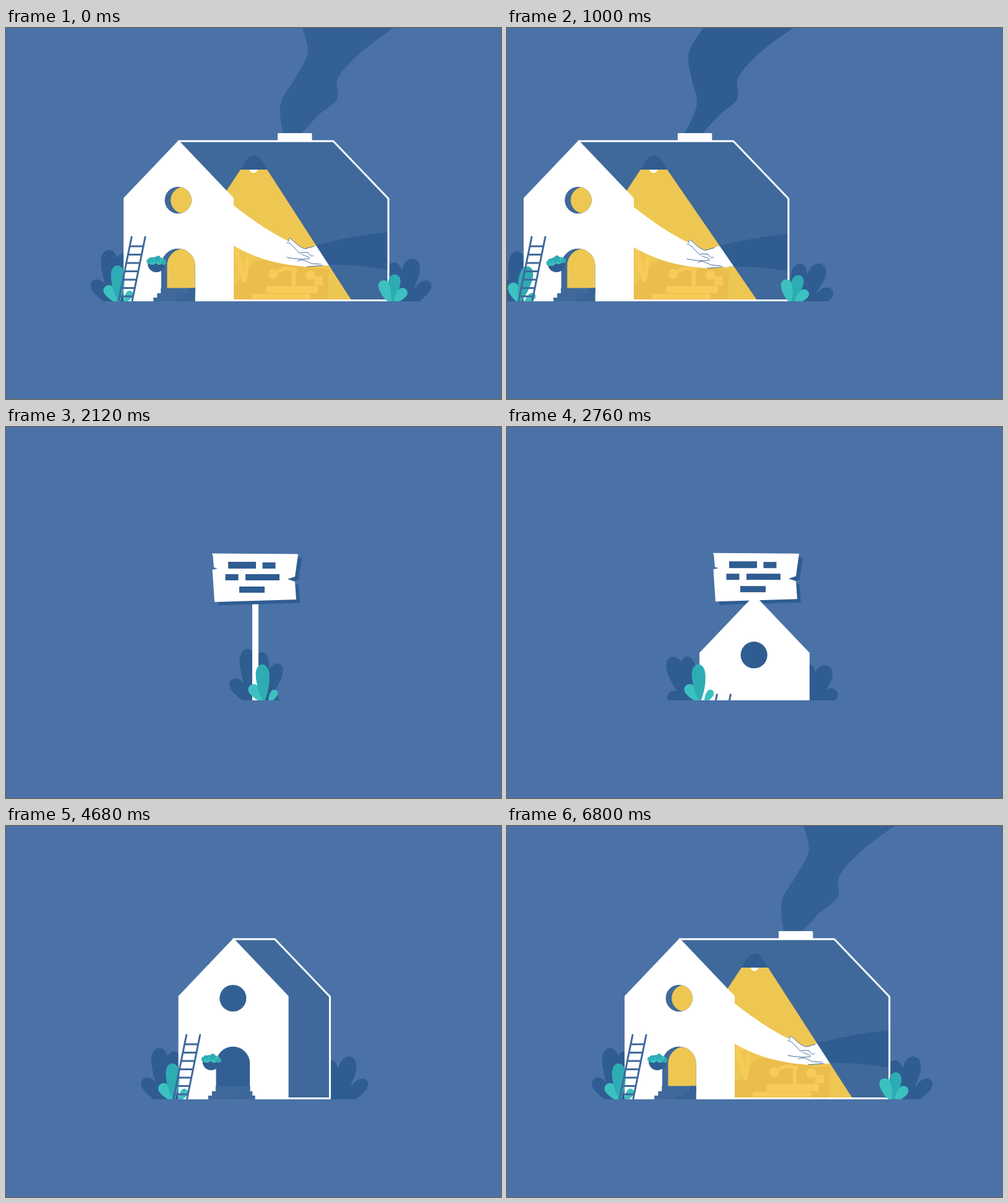
An HTML page with a canvas that plays this animation: 800x600 px, repeating every 6.84 s.

```html
<!DOCTYPE html>
<html lang="en">
<head>
<meta charset="utf-8">
<title>House</title>
<style>
html, body { margin: 0; width: 100%; height: 100%; overflow: hidden; background: #4a72a7; }
canvas { display: block; }
</style>
</head>
<body>
<canvas id="stage" width="800" height="600"></canvas>
<script>
const g = document.getElementById('stage').getContext('2d');
const LOOP = 6840, GROUND = 442;
const BG = '#4a72a7', DARK = '#2f5d92', ROOM = '#3f699b', WHITE = '#fff';
const GOLD = '#eec752', OCHRE = '#ebbd4c', AMBER = '#f6cb58';
const TEAL = '#2eacb4', MINT = '#3dc0c0';

const clamp = v => Math.max(0, Math.min(1, v));
const ramp = (t, a, b) => clamp((t - a) / (b - a));
const lerp = (a, b, k) => a + (b - a) * k;
const inOut = u => u < .5 ? 4 * u ** 3 : 1 - 4 * (1 - u) ** 3;
const out = u => 1 - (1 - u) ** 3;
const back = u => 1 + 2.7 * (u - 1) ** 3 + 1.7 * (u - 1) ** 2;
const rad = d => d * Math.PI / 180;

function poly(points, color) {
  g.beginPath();
  points.forEach(([x, y]) => g.lineTo(x, y));
  g.closePath();
  if (color) { g.fillStyle = color; g.fill(); }
}
function box(x, y, w, h, color) { g.fillStyle = color; g.fillRect(x, y, w, h); }
function disc(x, y, r, color) {
  g.beginPath(); g.arc(x, y, r, 0, 7);
  g.fillStyle = color; g.fill();
}
function shape(d, color) { g.fillStyle = color; g.fill(new Path2D(d)); }
function lines(d, color, width) {
  g.strokeStyle = color; g.lineWidth = width;
  g.lineCap = g.lineJoin = 'round';
  g.stroke(new Path2D(d));
}
function group(draw) { g.save(); draw(); g.restore(); }

// Leaves: base offset, length, half width, angle, colour
const LEFT_BUSH = [[12, 95, 14.5, -8], [18, 89, 12.5, 4], [15, 60, 11.5, -43], [22, 76, 12, 23]];
const RIGHT_BUSH = [[-20, 83, 14.5, 16], [-12, 58, 11, 43], [-29, 74, 13, -1]];
const LEFT_TEAL = [[0, 36, 9, -38, MINT], [7, 24, 6, 32, MINT], [0, 62, 11, -3, TEAL]];
const RIGHT_TEAL = [[0, 48, 10, 9, TEAL], [-1, 40, 9, -20, MINT], [4, 31, 8, 40, MINT]];

function leaf(x, y, len, w, deg, color) {
  if (len <= 0) return;
  group(() => {
    g.translate(x, y);
    g.rotate(rad(deg));
    g.beginPath();
    g.moveTo(0, 0);
    g.bezierCurveTo(-w * .7, -len * .25, -w, -len * .5, -w, -len * .72);
    g.bezierCurveTo(-w, -len * .9, -w * .55, -len, 0, -len);
    g.bezierCurveTo(w * .55, -len, w, -len * .9, w, -len * .72);
    g.bezierCurveTo(w, -len * .5, w * .7, -len * .25, 0, 0);
    g.fillStyle = color; g.fill();
  });
}
// Slanted leaves lean and shorten more than upright ones
function bush(leaves, x, lean, droop, grow, from, to) {
  leaves.forEach(([dx, len, w, a]) => {
    const slant = Math.abs(a);
    leaf(x + dx, 453, len * grow * (1 - droop * (.05 + slant / 210)), w * grow, a + lean * (.85 + slant / 80), DARK);
  });
  poly([[x + from, 442], [x + from + 9, 442 - 28 * grow], [x + to - 12, 442 - 28 * grow], [x + to, 442]], DARK);
}
function tealBush(leaves, x, lean, grow) {
  leaves.forEach(([dx, len, w, a, c], i) => {
    const k = grow(i);
    leaf(x + dx, 446, len * k, w * Math.min(1, k), a + lean - (1 - k) * 15, c);
  });
}

// Smoke edges at six heights, for three moments
const SMOKE_Y = [170, 140, 115, 80, 40, 0];
const SMOKE = [
  { t: 5400, l: [456, 457, 451, 450, 471, 495], r: [487, 494, 503, 567, 588, 598] },
  { t: 6830, l: [447, 443, 446, 468, 488, 479], r: [478, 506, 535, 537, 573, 626] },
  { t: 7840, l: [450, 465, 470, 461, 457, 480], r: [480, 507, 535, 537, 572, 625] }
];
function edge(points) {
  for (let i = 0; i < points.length - 1; i++) {
    const p = points[Math.max(0, i - 1)], a = points[i], b = points[i + 1];
    const n = points[Math.min(points.length - 1, i + 2)];
    g.bezierCurveTo(a[0] + (b[0] - p[0]) / 6, a[1] + (b[1] - p[1]) / 6,
      b[0] - (n[0] - a[0]) / 6, b[1] - (n[1] - a[1]) / 6, b[0], b[1]);
  }
}
function smoke(t) {
  const alpha = t < 5400 ? ramp(t, 5000, 5400) * .28 : t < 6840 ? lerp(.28, .85, ramp(t, 5400, 6840)) : lerp(.85, 1, ramp(t, 6840, 7300));
  if (!alpha) return;
  const i = t < SMOKE[1].t ? 0 : 1, a = SMOKE[i], b = SMOKE[i + 1];
  const k = ramp(t, a.t, b.t);
  const side = s => SMOKE_Y.map((y, n) => [lerp(a[s][n], b[s][n], k), y]);
  const left = side('l'), right = side('r').reverse();
  group(() => {
    g.globalAlpha = alpha;
    g.beginPath();
    g.moveTo(...left[0]);
    edge(left);
    g.lineTo(...right[0]);
    edge(right);
    g.fillStyle = DARK; g.fill();
  });
}

function furniture() {
  box(372, 338, 52, 24, AMBER);
  box(380, 342, 14, 16, OCHRE);
  box(406, 342, 13, 16, OCHRE);
  shape('M368 414 C384 412 388 384 405 377 C430 372 462 376 482 388 L522 390 L520 439 H368Z', OCHRE);
  shape('M384 412 C374 392 368 372 371 352 C380 368 386 390 386 412Z M384 412 C383 390 386 372 391 358 C395 378 391 398 388 412Z', AMBER);
  box(372, 415, 25, 23, OCHRE);
  box(397, 430, 95, 8, AMBER);
  box(420, 417, 84, 12, AMBER);
  disc(432, 398, 8, AMBER);
  disc(492, 400, 8, AMBER);
  lines('M442 392 C452 387 460 389 468 391 M465 392 V414', AMBER, 6);
  box(498, 402, 14, 14, AMBER);
}

const OPEN_HAND = 'M330 300 L368 305 C385 304 395 306 405 309 C409 300 414 292 420 290 C424 292 419 300 416 305 ' +
  'C423 297 430 291 434 293 C436 297 427 305 421 311 C430 305 440 301 444 304 C444 310 430 317 422 324 ' +
  'C432 321 443 320 445 323 C445 329 432 333 420 337 C402 342 385 345 368 346 L330 348Z';
const OPEN_LINES = 'M375 315 C385 312 395 314 401 317 C406 317 412 314 417 309 C416 316 402 325 391 334 M407 309 C411 299 415 292 420 290 ' +
  'C423 293 419 300 415 307 M416 305 C423 297 430 291 434 293 C435 298 427 305 420 311 M421 311 C430 305 440 301 444 304 C443 311 428 319 419 327 ' +
  'M422 324 C432 321 443 320 445 323 C445 329 432 333 421 336';
const LEFT_ARM = 'M340 266 L368 287 C397 310 428 331 457 345 C455 341 458 338 462 342 C469 349 476 355 484 357 L500 353 L522 384 ' +
  'L485 386 C440 383 402 372 368 352 L340 340Z';
const RIGHT_ARM = 'M478 357 C488 357 494 354 502 351 C540 341 575 335 617 330 V391 C585 385 555 383 522 383 L490 386 C473 384 468 378 478 373Z';
const SHAKE_LINES = 'M454 347 C462 347 468 360 476 365 M457 345 C455 340 459 339 463 343 C470 350 477 356 484 357 L498 353 ' +
  'M454 371 C465 373 478 375 490 373 C491 370 487 370 478 366 M476 363 L488 363 C491 369 495 370 497 368 M471 377 C478 372 484 377 494 381 L509 382 M487 386 L512 384';

function arms(t, cone) {
  if (t < 5120) return;
  const reach = inOut(ramp(t, 5560, 6060));
  const bob = 2.5 * inOut(ramp(t, 7140, 7840));
  const rightArm = color => group(() => {
    g.translate(145 * (1 - reach), bob);
    shape(RIGHT_ARM, color);
    if (reach < 1) box(612, 330, 150, 61, color);
  });
  rightArm(DARK);
  group(() => {
    poly(cone);
    g.clip();
    rightArm(WHITE);
    if (reach >= 1) {
      g.translate(0, bob);
      shape(LEFT_ARM, WHITE);
      lines(SHAKE_LINES, ROOM, 1);
    } else {
      const dx = 42 * reach - 85 * (1 - out(ramp(t, 5120, 5400))), dy = 38 * reach;
      poly([[340, 305 - 39 * reach], [368 + dx, 305 + dy], [368 + dx, 346 + dy], [368, 346 + 6 * reach], [340, 342]], WHITE);
      g.translate(dx, dy);
      shape(OPEN_HAND, WHITE);
      lines(OPEN_LINES, ROOM, 1);
    }
  });
}

function room(t, p, fx, speed) {
  const bx = fx + 250 * p, wall = bx + 89;
  const shell = [[fx, 183], [bx, 183], [wall, 276], [wall, 441], [fx, 441]];
  const light = ramp(t, 4950, 5150);
  const foot = 555 + 2.5 * ramp(t, 5400, 6800) + 11 * speed;
  const cone = [[379, 229], [422, 229], [foot, 439], [240, 439]];
  poly(shell, ROOM);
  group(() => {
    poly(shell);
    g.clip();
    group(() => {
      g.globalAlpha = light;
      poly(cone, GOLD);
      g.clip();
      g.globalAlpha = ramp(t, 5080, 5350);
      furniture();
    });
    arms(t, cone);
    g.globalAlpha = ramp(t, 4800, 4950);
    disc(400, 228, 6.5, WHITE);
    shape('M379 229 C386 219 390 207 401 206 C411 207 416 219 422 229Z', DARK);
  });
  lines(`M${fx} 183 H${bx} L${wall} 276 V440.5 H${fx}`, WHITE, 3);
}

function basket(x, y, tilt) {
  group(() => {
    g.translate(x, y);
    g.rotate(rad(tilt));
    g.beginPath(); g.arc(0, 0, 14, 0, Math.PI);
    g.fillStyle = DARK; g.fill();
    for (let i = 0; i < 14; i++) {
      const u = i / 13;
      disc(-12 + 24 * u, -4 - 5 * Math.sin(Math.PI * u) * (i % 3) / 2 + 2 * (i % 2), 4, i % 3 ? TEAL : MINT);
    }
  });
}
function ladder(x, y) {
  let d = `M${x + 21} ${y - 103} L${x} ${y} M${x + 43} ${y - 103} L${x + 22} ${y}`;
  for (let i = 0; i < 7; i++) {
    const h = 7 + i * 13.5, left = x + h * .204;
    d += ` M${left} ${y - h} h22`;
  }
  lines(d, ROOM, 3);
}
function arch(cx) {
  g.beginPath();
  g.arc(cx, 384, 27.3, Math.PI, 0);
  g.lineTo(cx + 27.3, 442);
  g.lineTo(cx - 27.3, 442);
  g.closePath();
}
function opening(path, x, p, light) {
  group(() => {
    path(x);
    g.fillStyle = DARK; g.fill();
    g.clip();
    g.globalAlpha = p;
    g.fillStyle = ROOM; g.fill();
    g.globalAlpha = light;
    path(x + 9.5 * p);
    g.fillStyle = GOLD; g.fill();
  });
}
function porthole(cx) { g.beginPath(); g.arc(cx, 278.5, 21.6, 0, 7); }

function front(t, p, fx, lift) {
  const door = fx - .8, light = ramp(t, 4950, 5150);
  group(() => {
    g.translate(0, lift);
    if (t > 3450) poly([[fx - 43, 222], [fx - 40.5, 220.5], [fx - 38, 224]], DARK);
    poly([[fx, 181.5], [fx + 89, 275], [fx + 89, 705], [fx - 89, 705], [fx - 89, 275]], WHITE);
    opening(porthole, door, p, light);
    opening(arch, door, p, light);
    const r1 = lerp(33, 27.3, p), r2 = lerp(39, 27.3, p);
    poly([[-28, 420.5], [27.8, 420.5], [27.8, 429], [r1, 429], [r1, 436], [r2, 436], [r2, 443],
      [-40, 443], [-40, 436], [-34, 436], [-34, 429], [-28, 429]].map(([x, y]) => [door + x, y]), ROOM);
    group(() => {
      g.globalAlpha = p * .5;
      poly([[27, 420], [27, 443], [-3, 443], [-3, 436], [7, 436], [7, 429], [17, 429], [17, 420]]
        .map(([x, y]) => [door + x, y]), DARK);
    });
  });
}

const rise = t => 261 * (1 - inOut(ramp(t, 2549, 2929)));

function sign(t) {
  if (t < 1400 || t > 3480) return;
  const k = back(ramp(t, 1480, 1860));
  let y = lerp(438, 244, k), turn = lerp(-28, 0, k);
  const size = lerp(.36 * ramp(t, 1400, 1480), 1, k);
  if (t > 2600) y = Math.min(244, 181.5 + rise(t) - 28.5);
  if (t > 2900) {
    const d = t - 2900;
    y = Math.min(305, 153 - .283 * d + .001 * d * d);
    turn = -3 * Math.sin(ramp(d, 0, 550) * Math.PI);
  }
  const board = [[-69, -39], [69, -38], [64, -2], [52, 2], [64, 6], [66, 35], [-66, 39], [-69.5, -13], [-61, -15], [-67, -17]];
  group(() => {
    g.translate(lerp(412.5, 403, k), y);
    g.rotate(rad(turn));
    g.scale(size, size);
    if (t < 2800) box(-5, 30, 10, 260, WHITE);
    poly(board.map(([a, b]) => [a + 6, b + 5.5]), DARK);
    poly(board, WHITE);
    lines('M-69 -38.5 L68 -37.5', WHITE, 2);
    [[-44, -26, 45, 11], [11.5, -25, 21, 10], [-48.5, -6, 21, 10], [-16, -6, 55, 10], [-26, 14, 41, 10]]
      .forEach(r => box(...r, DARK));
  });
}

function home(t, { p, lift, leftX, rightX, leftLean, rightLean, droop, speed, rightGrow, sprout }) {
  const fx = 400 - 121 * p;
  if (p > 0) {
    smoke(t);
    const h = 13 * back(ramp(t, 5050, 5330));
    if (h > 0) { g.beginPath(); g.roundRect(439, 183 - h, 55.5, h, 1.5); g.fillStyle = WHITE; g.fill(); }
  }
  bush(LEFT_BUSH, leftX, leftLean, droop, 1, -10, 52);
  if (rightGrow > 0) bush(RIGHT_BUSH, rightX, rightLean, droop, rightGrow, -38, 12);
  if (p > 0) room(t, p, fx, speed);
  sign(t);
  if (lift < 261) front(t, p, fx, lift);
  tealBush(LEFT_TEAL, leftX + 27 - 10 * p, 21 * speed, () => sprout);
  if (p > .9) {
    const starts = [5150, 5280, 5500];
    tealBush(RIGHT_TEAL, 622, 10 * speed, i => back(ramp(t, starts[i], starts[i] + 360)));
  }
  if (lift < 261) {
    ladder(fx - 97 + .17 * lift, 441 + lift * 1.05);
    const settle = t < 4300 ? 8 * Math.sin((t - 2925) / 110) * (1 - ramp(t, 2925, 3700)) : 0;
    basket(fx - 36, 381 + lift, -17 * speed + settle);
  }
}

function leaving(t) {
  const u = ramp(t, 397, 1977);
  const speed = 1.386 * (u < .5 ? 4 * u * u : 4 * (1 - u) ** 2);
  group(() => {
    g.translate(-730 * inOut(u), 0);
    home(t + LOOP, {
      p: 1, lift: 0, leftX: 166, rightX: 657, leftLean: 12 * speed, rightLean: 12 * speed,
      droop: ramp(u, .2, .7), speed, rightGrow: 1, sprout: 1
    });
  });
}

function arriving(t) {
  const p = inOut(ramp(t, 4340, 5180));
  const split = inOut(ramp(t, 2480, 2860));
  const slide = 460 * (1 - inOut(ramp(t, 860, 1560)));
  const sway = Math.sin(Math.PI * ramp(t, 2480, 3040));
  home(t, {
    p, lift: rise(t),
    leftX: lerp(390, 277, split) + slide - 111 * p,
    rightX: lerp(420, 517, split) + 140 * p,
    leftLean: -14.5 * sway, rightLean: 6.5 * sway, droop: sway, speed: 0,
    rightGrow: Math.min(1, split * 1.1),
    sprout: back(ramp(t, 1460, 1860))
  });
}

function draw(t) {
  box(0, 0, 800, 600, BG);
  group(() => {
    g.beginPath(); g.rect(0, 0, 800, GROUND); g.clip();
    if (t < 1980) leaving(t);
    if (t > 860) arriving(t);
  });
}

const start = performance.now();
function tick() {
  draw((performance.now() - start) % LOOP);
  requestAnimationFrame(tick);
}
tick();
</script>
</body>
</html>
```
